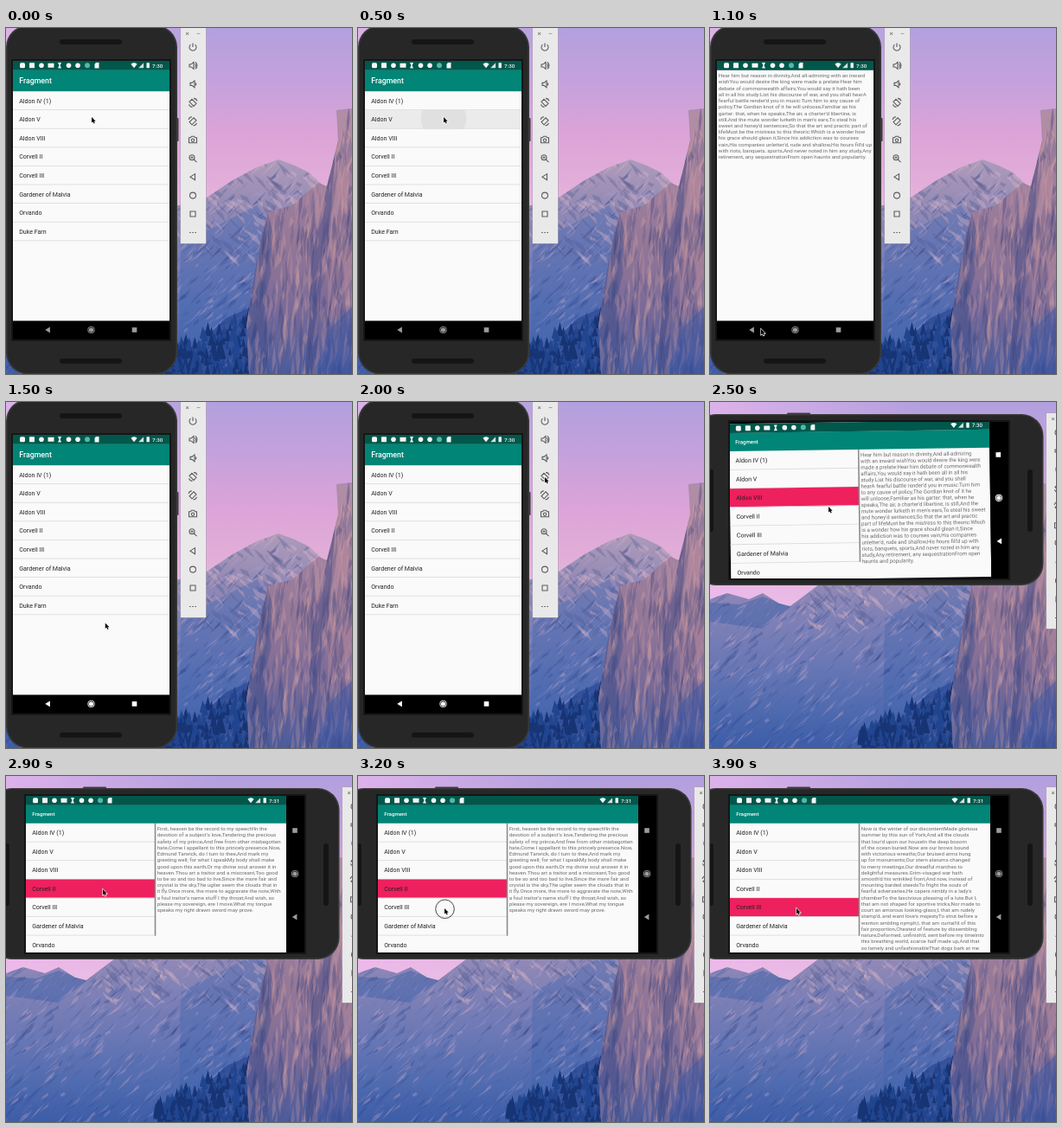
These frames come from a looping animation (400x400 px, 4 s). An HTML page with a canvas:

```html
<!DOCTYPE html>
<html lang="en">
<head>
<meta charset="utf-8">
<style>
html, body { margin: 0; width: 100%; height: 100%; overflow: hidden; }
canvas { display: block; }
</style>
</head>
<body>
<canvas id="stage" width="400" height="400"></canvas>
<script>
const LOOP = 4000, ROW = 21.6, LINE = 7.23;
const PLAYS = ['Aldon IV (1)', 'Aldon V', 'Aldon VIII', 'Corvell II', 'Corvell III',
  'Gardener of Malvia', 'Orvando', 'Duke Farn'];

// "|" breaks a line in portrait, "/" in landscape.
const KING = `Hear him but reason in divinity,And all-admiring/with an inward|wishYou would desire the king were/made a prelate:Hear him|debate of commonwealth/affairs,You would say it hath been|all in all his/study:List his discourse of war, and you shall/hearA|fearful battle render'd you in music:Turn him/to any cause of|policy,The Gordian knot of it he/will unloose,Familiar as his|garter: that, when he/speaks,The air, a charter'd libertine, is|still,And the/mute wonder lurketh in men's ears,To steal his|sweet/and honey'd sentences;So that the art and practic/part of|lifeMust be the mistress to this theoric:Which/is a wonder how|his grace should glean it,Since/his addiction was to courses|vain,His companies/unletter'd, rude and shallow,His hours fill'd up|with/riots, banquets, sports,And never noted in him any/study,Any|retirement, any sequestrationFrom open/haunts and popularity.`;
const DUEL = `First, heaven be the record to my speech!In the/devotion of a subject's love,Tendering the precious/safety of my prince,And free from other misbegotten/hate,Come I appellant to this princely presence.Now,/Edmund Tarwick, do I turn to thee,And mark my/greeting well; for what I speakMy body shall make/good upon this earth,Or my divine soul answer it in/heaven.Thou art a traitor and a miscreant,Too good/to be so and too bad to live,Since the more fair and/crystal is the sky,The uglier seem the clouds that in/it fly.Once more, the more to aggravate the note,With/a foul traitor's name stuff I thy throat;And wish, so/please my sovereign, ere I move,What my tongue/speaks my right drawn sword may prove.`;
const WINTER = `Now is the winter of our discontentMade glorious/summer by this sun of York;And all the clouds/that lour'd upon our houseIn the deep bosom/of the ocean buried.Now are our brows bound/with victorious wreaths;Our bruised arms hung/up for monuments;Our stern alarums changed/to merry meetings,Our dreadful marches to/delightful measures.Grim-visaged war hath/smooth'd his wrinkled front;And now, instead of/mounting barded steedsTo fright the souls of/fearful adversaries,He capers nimbly in a lady's/chamberTo the lascivious pleasing of a lute.But I,/that am not shaped for sportive tricks,Nor made to/court an amorous looking-glass;I, that am rudely/stamp'd, and want love's majestyTo strut before a/wanton ambling nymph;I, that am curtail'd of this/fair proportion,Cheated of feature by dissembling/nature,Deformed, unfinish'd, sent before my timeInto/this breathing world, scarce half made up,And that/so lamely and unfashionableThat dogs bark at me/as I halt by them;`;

// Pointer path: time, x, y
const POINTER = [[0, 99, 103], [700, 99, 103], [1000, 59, 348], [1300, 59, 348], [1800, 216, 87],
  [2100, 216, 87], [2450, 137, 121], [2600, 137, 121], [2750, 112, 131], [2900, 112, 131],
  [3100, 100, 153], [LOOP, 100, 153]];

const ctx = document.getElementById('stage').getContext('2d');

function rect(x, y, w, h, color) {
  ctx.fillStyle = color;
  ctx.fillRect(x, y, w, h);
}
function pill(x, y, w, h, r, color) {
  ctx.fillStyle = color;
  ctx.beginPath();
  ctx.roundRect(x, y, w, h, r);
  ctx.fill();
}
function disc(x, y, r, color) {
  ctx.fillStyle = color;
  ctx.beginPath();
  ctx.arc(x, y, r, 0, 7);
  ctx.fill();
}
function label(str, x, y, size, color, weight = 400) {
  ctx.font = `${weight} ${size}px Roboto, sans-serif`;
  ctx.fillStyle = color;
  ctx.fillText(str, x, y + size * 0.355);
}
function shape(d, x, y, color) {
  ctx.save();
  ctx.translate(x, y);
  ctx.fillStyle = color;
  ctx.fill(new Path2D(d));
  ctx.restore();
}
function clipped(path, draw) {
  ctx.save();
  ctx.clip(path);
  draw();
  ctx.restore();
}
function fade(x0, y0, x1, y1, ...colors) {
  const g = ctx.createLinearGradient(x0, y0, x1, y1);
  colors.forEach((c, i) => g.addColorStop(i / (colors.length - 1), c));
  return g;
}

function paintWallpaper() {
  let seed = 7;
  const rnd = (a, b) => a + (b - a) * ((seed = seed * 16807 % 2147483647) / 2147483647);
  // Rough rock: slivers with uneven edges running along (dx, dy).
  const slivers = (n, x0, y0, x1, y1, dx, dy, colors) => {
    for (let i = 0; i < n; i++) {
      const x = rnd(x0, x1), y = rnd(y0, y1), k = rnd(0.3, 1.3), w = rnd(1, 5);
      ctx.fillStyle = colors[i % colors.length];
      ctx.beginPath();
      ctx.moveTo(x, y);
      ctx.lineTo(x + dx * k * 0.5 + w, y + dy * k * rnd(0.3, 0.6));
      ctx.lineTo(x + dx * k + rnd(-3, 3), y + dy * k);
      ctx.lineTo(x + dx * k * 0.4 - w * 0.5, y + dy * k * 0.5);
      ctx.fill();
    }
  };
  rect(0, 0, 400, 400, fade(0, 0, 0, 240, '#b2a0de', '#c4a1dc', '#dba3d8', '#e2aed8', '#e6c0df'));
  rect(0, 0, 400, 400, fade(0, 0, 240, 0, '#efb9f0b0', '#efb9f000'));

  const mountain = new Path2D('M0 228L20 221 45 228 61 221 80 233 93 236 126 211 200 205 232 196 262 176 290 161 315 152 334 159 350 167 375 190 400 200V400H0Z');
  clipped(mountain, () => {
    rect(0, 150, 400, 250, fade(0, 150, 0, 400, '#af9cba', '#978cb5', '#7f81b6', '#6b78b5', '#526cb0', '#3c5da8'));
    shape('M0 232L35 234 61 225 93 237 60 262 0 254Z', 0, 0, '#4866aa90');
    shape('M202 250L290 205 300 220 280 330 200 370Z', 0, 0, '#3f63ad60');
    slivers(1300, -10, 150, 410, 400, -17, 17, ['#e0b0c648', '#263f8448', '#a5a0d048', '#3a559c48']);
    slivers(260, 100, 150, 400, 260, 14, 15, ['#e8bcc450', '#4b568e50']);
  });

  shape('M180 400L200 378 230 358 255 335 285 322 290 400Z', 0, 0, '#1f3f8a90');
  for (let i = 0; i < 260; i++) {
    const x = rnd(172, 288), y = rnd(386 - (x - 172) * 0.5, 405), h = rnd(7, 17);
    shape(`M0 ${-h}l${h * 0.25} ${h}h${-h * 0.5}Z`, x, y, i % 2 ? '#173474' : '#21458f');
  }

  const cliff = new Path2D('M382 95L400 93V400H281L278 345 286 290 296 240 303 213 331 205 361 179 371 183 384 130Z');
  clipped(cliff, () => {
    rect(270, 90, 130, 310, fade(0, 90, 0, 400, '#a78eaf', '#a0809f', '#957897', '#7b6b98', '#4b5c9c'));
    shape('M275 400L278 330 296 240 303 213 309 240 300 310 304 400Z', 0, 0, '#40508e80');
    shape('M371 183L384 130 381 190 366 270 358 400 346 400 354 260Z', 0, 0, '#3f488570');
    shape('M384 96L400 95V290L372 335 373 240Z', 0, 0, '#c08f9b66');
    slivers(600, 275, 80, 405, 400, -3, 40, ['#dfa69f48', '#2f3c7c48', '#c294a448', '#50558c48']);
  });
  shape('M400 322L372 350 360 400H400Z', 0, 0, '#3a56a470');
}

const BUTTONS = [
  'M-2.6-2.8A4 4 0 1 0 2.6-2.8M0-4.5V0',
  'M-4-1.5h2l3-2.5v8l-3-2.5h-2ZM2.5-2q2 2 0 4M3-4q4 4 0 8',
  'M-3-1.5h2l3-2.5v8l-3-2.5h-2ZM3-1.5q1.5 1.5 0 3',
  'M-1-4L4 1 1 4-4-1ZM-4.5 2q1 3 4 3M1-5q3 0 4 3',
  'M1-4L-4 1-1 4 4-1ZM4.5 2q-1 3-4 3M-1-5q-3 0-4 3',
  'M-4.5-2.5h2l1-1.5h3l1 1.5h2v6h-9ZM1.7.5a1.7 1.7 0 1 1-3.4 0a1.7 1.7 0 1 1 3.4 0',
  'M2-1a3 3 0 1 1-6 0a3 3 0 1 1 6 0M1.2 1.2L4.5 4.5M-2.5-1h3M-1-2.5v3',
  'M2.5-3.5v7L-3 0Z',
  'M3.5 0a3.5 3.5 0 1 1-7 0a3.5 3.5 0 1 1 7 0',
  'M-3-3h6v6h-6Z',
  'M-4 0h1.6M-.8 0h1.6M2.4 0h1.6'
].map(d => new Path2D(d));

function toolbar(x, y) {
  ctx.save();
  ctx.translate(x, y);
  rect(-0.5, -0.5, 30, 250, '#a9a3b0');
  rect(0, 0, 29, 249, '#e9e9e9');
  label('×', 5.5, 6, 8, '#666');
  label('–', 18, 6, 8, '#666');
  ctx.strokeStyle = '#5c5c5c';
  ctx.lineWidth = 1.1;
  ctx.translate(14, 22);
  for (const b of BUTTONS) {
    ctx.stroke(b);
    ctx.translate(0, 21.45);
  }
  ctx.restore();
}

function phoneBody() {
  pill(196, 104, 3.5, 27, 1, '#3c3c40');
  pill(0, -3, 198, 403.5, 25, '#3a3a3b');
  pill(1.5, -1.5, 195, 400.5, 24, '#272727');
  rect(6, 36, 185, 326, '#161616');
  pill(62, 13, 72, 6, 3, '#151515');
  pill(62, 382, 72, 6, 3, '#151515');
}

function statusBar(w, clock) {
  rect(0, 0, w, 10.8, '#00574b');
  const white = '#f4f8f7', y = 5.3;
  pill(8, y - 3, 6, 6, 1.5, white);
  pill(19, y - 3, 6, 6, 0.5, white);
  disc(33, y, 2.8, white);
  pill(40.5, y - 2.5, 7, 5, 0.5, white);
  shape('M-2-3.3h4L.6 0 2 3.3h-4L-.6 0Z', 54, y, white);
  disc(64.5, y, 2.8, white);
  disc(75, y, 2.8, white);
  disc(86, y, 3, '#54b8a8');
  shape('M-1-3.2h3.5v6.4h-5V-1.5Z', 97, y, white);
  shape('M-3.6-1.6Q0-4.4 3.6-1.6L0 3Z', w - 41, y, white);
  shape('M2.6-3v6h-6Z', w - 32.5, y, '#cfe0dd');
  pill(w - 26.5, y - 3, 3.4, 6, 0.5, white);
  label(clock, w - 20, y + 0.2, 6.2, white, 500);
}

function actionBar(w, h, size) {
  rect(0, 10.6, w, h, '#008577');
  label('Fragment', 7.2, 10.6 + h / 2, size, '#fff', 500);
}

function list(top, w, selected, ripple) {
  PLAYS.forEach((name, i) => {
    const y = top + i * ROW;
    if (i === selected) rect(0, y, w, ROW, '#ee205e');
    if (i === 1 && ripple > 0) {
      const row = new Path2D();
      row.rect(0, y, w, ROW);
      clipped(row, () => {
        rect(0, y, w, ROW, '#ebebeb');
        disc(91, y + 10, ripple, '#e0e0e0');
      });
    }
    rect(0, y + ROW - 0.6, w, 0.8, '#dadada');
    label(name, 7.2, y + ROW / 2, 7.05, '#222');
  });
}

function speech(text, x, y, landscape) {
  const [cut, join] = landscape ? ['/', '|'] : ['|', '/'];
  text.replaceAll(join, ' ').split(cut)
    .forEach((line, i) => label(line, x, y + i * LINE, 6.17, '#6a6a6a'));
}

// Navigation buttons run along the device's bottom edge.
function navigation(x, y, landscape, color) {
  const at = k => landscape ? [x, y - k] : [x + k, y];
  shape('M2.4-3.4v6.8L-3.2 0Z', ...at(-50), color);
  const [cx, cy] = at(0);
  disc(cx, cy, 4.1, color);
  disc(cx, cy, 3.2, '#000');
  disc(cx, cy, 2.6, color);
  const [sx, sy] = at(50);
  rect(sx - 2.8, sy - 2.8, 5.6, 5.6, color);
}

function withScreen(x, y, w, h, draw) {
  ctx.save();
  ctx.translate(x, y);
  const area = new Path2D();
  area.rect(0, 0, w, h);
  ctx.clip(area);
  rect(0, 0, w, h, '#000');
  draw();
  ctx.restore();
}

function portrait(t, navColor) {
  withScreen(8, 38, 181, 322, () => {
    rect(0, 0, 181, 300.5, '#fafafa');
    if (t >= 600 && t < 1300) {
      speech(KING, 1.8, 17, false);
    } else {
      actionBar(181, 24.6, 8.8);
      list(35.2, 181, -1, t >= 400 && t < 600 ? 6 + (t - 400) / 5 : 0);
    }
    statusBar(181, '7:30');
    navigation(90.5, 311, false, navColor);
  });
}

function landscape(t, navColor) {
  const p = Math.min(1, (t - 2200) / 380);
  const [selected, text] = t < 2800 ? [2, KING] : t < 3300 ? [3, DUEL] : [4, WINTER];
  withScreen(23, 23, 322, 181, () => {
    ctx.translate(161, 90.5);
    ctx.rotate(-Math.PI / 2 * (1 - p) ** 3);
    ctx.translate(-161, -90.5);
    rect(0, 0, 301, 181, '#fafafa');
    list(31.7, 150, selected, 0);
    rect(148.7, 31.7, 1.6, 130, '#8c8c8c');
    speech(text, 151.7, 38, true);
    actionBar(301, 21.1, 6.17);
    statusBar(301, t < 2700 ? '7:30' : '7:31');
    rect(301, 0, 21, 181, '#000');
    navigation(311, 90, true, navColor);
  });
}

function pointer(t) {
  const i = POINTER.findIndex(k => k[0] > t);
  const [t0, x0, y0] = POINTER[i - 1], [t1, x1, y1] = POINTER[i];
  const u = (t - t0) / (t1 - t0), e = u * u * (3 - 2 * u);
  ctx.save();
  ctx.translate(x0 + (x1 - x0) * e, y0 + (y1 - y0) * e);
  if (t >= 3150 && t < 3300) {
    ctx.strokeStyle = '#333';
    ctx.lineWidth = 0.9;
    ctx.beginPath();
    ctx.arc(0.5, 0.8, 10.8, 0, 7);
    ctx.stroke();
  }
  const arrow = new Path2D('M0 0V6.6L1.5 5.2 2.6 7.6 3.7 7.1 2.7 4.8H4.7Z');
  ctx.strokeStyle = '#fff';
  ctx.lineWidth = 1.2;
  ctx.stroke(arrow);
  ctx.fillStyle = '#000';
  ctx.fill(arrow);
  ctx.restore();
}

paintWallpaper();
const wallpaper = document.createElement('canvas');
wallpaper.width = wallpaper.height = 400;
wallpaper.getContext('2d').drawImage(ctx.canvas, 0, 0);

function frame(now) {
  const t = now % LOOP;
  const turned = t >= 2100;
  const navColor = t >= 1200 && t < 2900 ? '#fff' : '#9c9c9c';
  ctx.drawImage(wallpaper, 0, 0);
  ctx.save();
  if (turned) ctx.transform(0, -1, 1, 0, -15, 212);
  phoneBody();
  if (t < 2200) portrait(t, navColor);
  ctx.restore();
  if (t >= 2200) landscape(t, navColor);
  if (turned) toolbar(389, 13);
  else toolbar(202, 0);
  pointer(t);
  requestAnimationFrame(frame);
}
requestAnimationFrame(frame);
</script>
</body>
</html>
```
